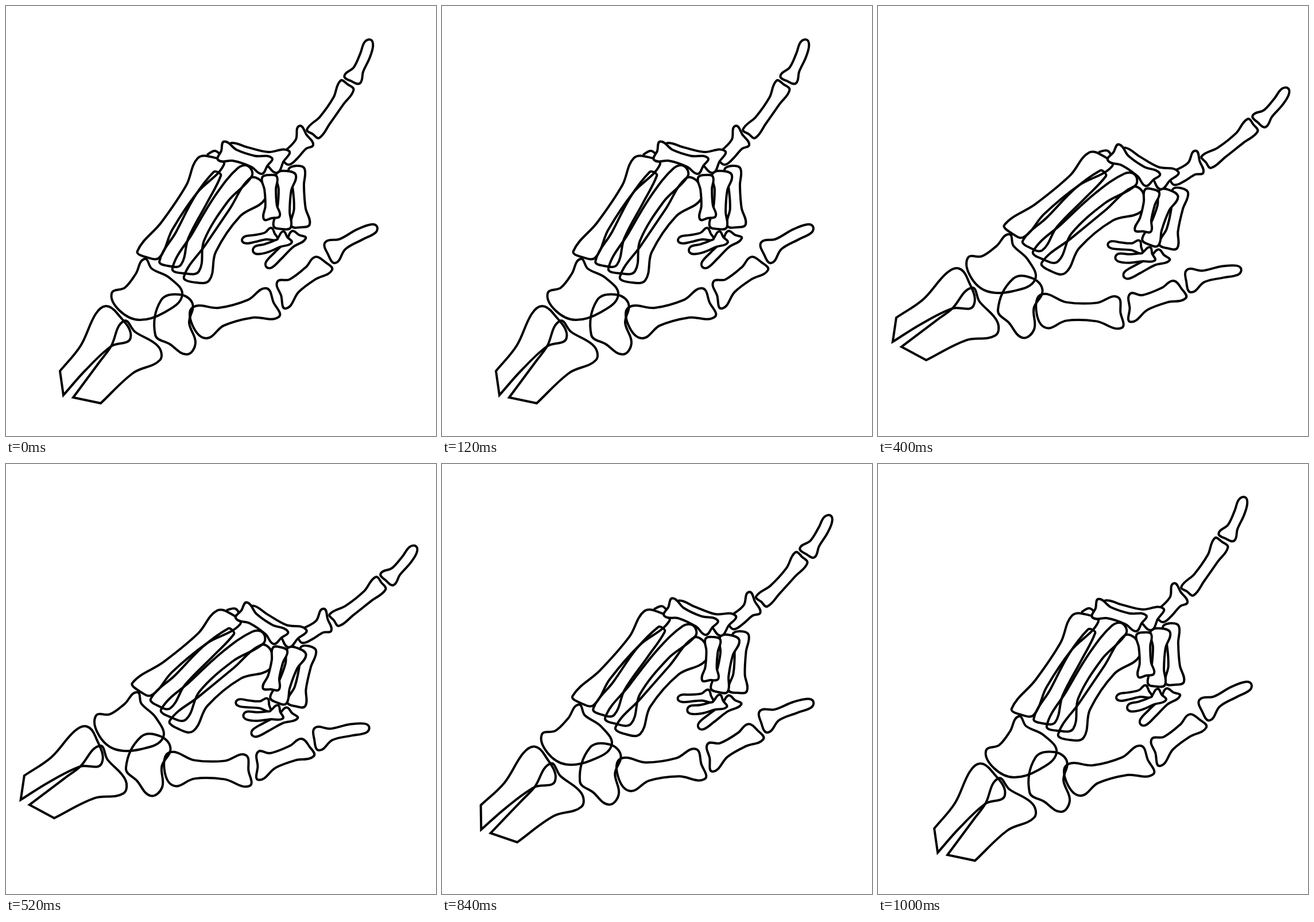
Animation, 749 px wide and 748 px high, one loop 1200 ms. Source, as an HTML page with a canvas:

```html
<!DOCTYPE html>
<html lang="en">
<head>
<meta charset="utf-8">
<title>Pointing skeleton hand</title>
<style>
  html, body { margin: 0; width: 100%; height: 100%; overflow: hidden; background: #fff; }
  canvas { display: block; }
</style>
</head>
<body>
<canvas id="stage" width="749" height="748"></canvas>
<script>
const ctx = document.getElementById('stage').getContext('2d');
const shapes = [];

// Smooth curve through the points; handles follow the neighbours' direction.
function curve(pts, closed) {
  const n = pts.length;
  const at = i => closed ? pts[(i + n) % n] : pts[Math.max(0, Math.min(n - 1, i))];
  const dir = i => {
    const [ax, ay] = at(i - 1), [bx, by] = at(i + 1);
    const d = Math.hypot(bx - ax, by - ay) || 1;
    return [(bx - ax) / d, (by - ay) / d];
  };
  const path = new Path2D();
  path.moveTo(...pts[0]);
  for (let i = 0; i < (closed ? n : n - 1); i++) {
    const [px, py] = at(i), [qx, qy] = at(i + 1);
    const [ux, uy] = dir(i), [vx, vy] = dir(i + 1);
    const h = Math.hypot(qx - px, qy - py) * 0.35;
    path.bezierCurveTo(px + ux * h, py + uy * h, qx - vx * h, qy - vy * h, qx, qy);
  }
  return path;
}

const parse = text => text.split(' ').map(p => p.split(',').map(Number));
const blob = text => shapes.push({ path: curve(parse(text), true) });

// Sawn-off bone: the last point joins the first by a straight edge.
function stump(text) {
  const path = curve(parse(text), false);
  path.closePath();
  shapes.push({ path });
}

// A bone runs from a to b with half-widths [start, shaft, end].
// bend bows the shaft, tilt slants the ends, cap rounds them outwards.
function bone(a, b, [wa, shaft, wb], { bend = 0, tilt = [0, 0], cap = [3, 3], solid = false } = {}) {
  const dx = b[0] - a[0], dy = b[1] - a[1], len = Math.hypot(dx, dy);
  const ux = dx / len, uy = dy / len;
  const place = (along, side) => [a[0] + ux * along - uy * side, a[1] + uy * along + ux * side];
  const bow = bend * 4 * 0.3 * 0.7;
  const edge = s => [
    place(s * tilt[0], s * wa),
    place(len * 0.3, bow + s * shaft),
    place(len * 0.7, bow + s * shaft),
    place(len + s * tilt[1], s * wb)
  ];
  const pts = [place(-cap[0], 0), ...edge(1), place(len + cap[1], 0), ...edge(-1).reverse()];
  shapes.push({ path: curve(pts, true), solid });
}

// forearm
stump('94,635 130,591 156,536 174,522 194,535 217,577 183,592 138,634 100,677');
stump('117,681 163,619 183,592 205,548 225,567 265,592 268,616 222,638 165,691');

// wrist
blob('241,440 226,466 207,490 184,500 198,530 232,546 276,533 307,503 285,473 254,457');
blob('270,512 303,502 325,518 319,551 330,586 315,606 285,588 260,572');

// palm
shapes.push({ path: curve(parse('350,259 364,252 376,261'), false) });
bone([248, 432], [357, 270], [19, 11.5, 22], { bend: -1, tilt: [6, 8], cap: [6, 8] });
bone([286, 447], [368, 292], [18, 12, 7], { bend: -5, tilt: [6, 0], cap: [6, 3] });
bone([313, 459], [416, 289], [21, 12, 14], { bend: -13, tilt: [10, 0], cap: [7, 12] });
bone([332, 474], [438, 318], [20, 11, 21], { bend: -11, tilt: [10, -8], cap: [8, 14] });

// thumb
bone([337, 551], [464, 516], [29, 16, 27], { tilt: [4, 4], cap: [13, 2] });
bone([480, 503], [553, 448], [23, 13.5, 18], { tilt: [-8, 5], cap: [1, 4] });
bone([565, 429], [640, 387], [20, 10, 8], { bend: -3, tilt: [-1, 0], cap: [5, 7] });

// index finger
bone([484, 268], [523, 225], [12, 12, 20], { bend: 4, tilt: [0, -4], cap: [2, 1] });
bone([535, 222], [594, 138], [13, 10.5, 14], { bend: 4, cap: [1, 2] });
bone([603, 128], [632, 66], [15, 9, 8], { bend: 3, cap: [3, 8] });

// curled fingertips
const solid = true;
bone([510, 398], [458, 450], [13, 8, 7], { tilt: [4, 0], cap: [0, 6], solid });
bone([490, 402], [436, 425], [12, 7.5, 7], { bend: -4, tilt: [3, 0], cap: [0, 6], solid });
bone([467, 396], [417, 407], [11, 6, 6], { bend: -1, tilt: [3, 0], cap: [1, 6], solid });

// curled fingers, back to front
bone([506, 284], [513, 381], [14, 10, 16], { bend: -1, cap: [6, 4], solid });
bone([488, 293], [481, 384], [17, 11, 15], { cap: [6, 4], solid });
bone([459, 298], [463, 368], [13, 10, 14], { tilt: [0, 2], cap: [4, 1], solid });
bone([390, 250], [482, 271], [12, 11, 21], { tilt: [0, -6], cap: [1, 1], solid });
bone([375, 252], [454, 278], [17, 10, 16], { tilt: [0, -4], cap: [0, 1], solid });

// The whole hand turns rigidly about a corner of the forearm, which drifts along.
const PIVOT = [165, 691];
const poses = [
  { until: 200, turn: 0, x: 165, y: 691 },
  { until: 400, turn: 7.2, x: 127, y: 661 },
  { until: 600, turn: 16.5, x: 84, y: 616 },
  { until: 1000, turn: 7.2, x: 131, y: 658 },
  { until: 1200, turn: 0, x: 169, y: 690 }
];

function draw(pose) {
  ctx.setTransform(1, 0, 0, 1, 0, 0);
  ctx.fillStyle = '#fff';
  ctx.fillRect(0, 0, 749, 748);
  ctx.translate(pose.x, pose.y);
  ctx.rotate(pose.turn * Math.PI / 180);
  ctx.translate(-PIVOT[0], -PIVOT[1]);
  ctx.strokeStyle = '#000';
  ctx.lineWidth = 4;
  for (const shape of shapes) {
    if (shape.solid) ctx.fill(shape.path);
    ctx.stroke(shape.path);
  }
}

const start = performance.now();
function tick() {
  const t = (performance.now() - start) % 1200;
  draw(poses.find(p => t < p.until));
  requestAnimationFrame(tick);
}
tick();
</script>
</body>
</html>
```
